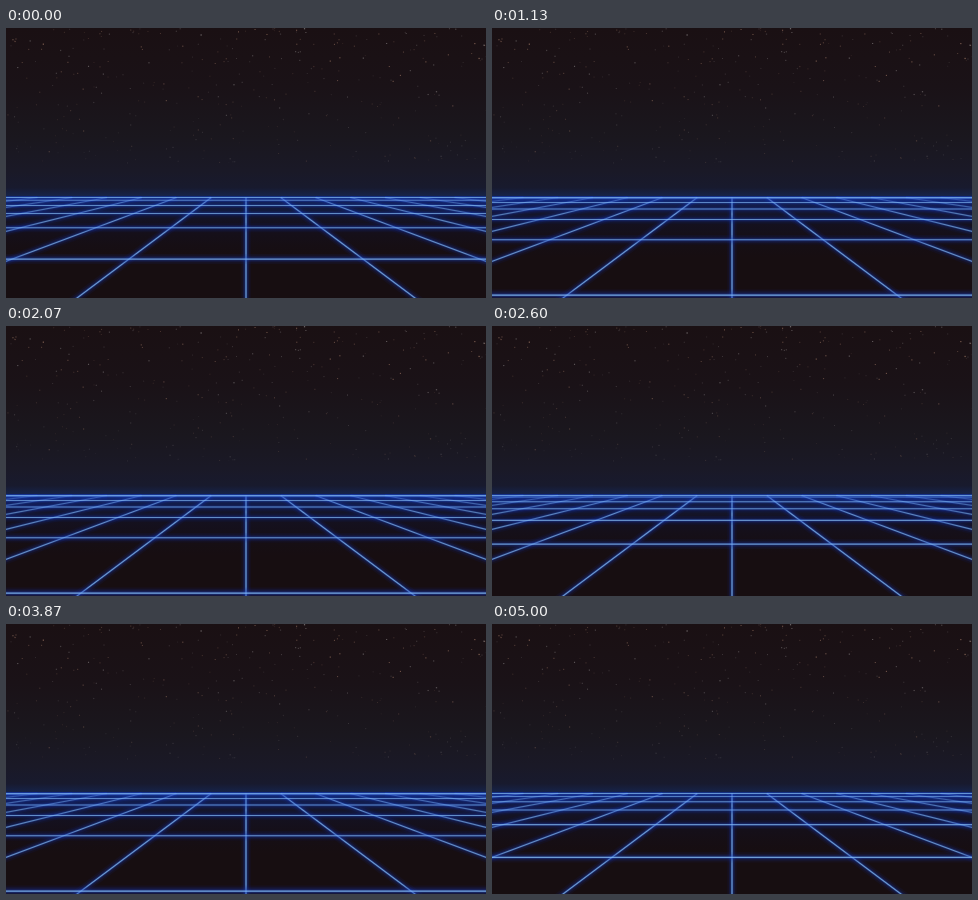
Recreate the animation shown at these times as an HTML page with a canvas. Size 480x270 px, loop 5070 ms.

```html
<!DOCTYPE html>
<html lang="en">
<head>
<meta charset="utf-8">
<title>Neon grid</title>
<style>
  html, body { margin: 0; width: 100%; height: 100%; overflow: hidden; background: #1a1115; }
  canvas { display: block; width: 100vw; height: 100vh; }
</style>
</head>
<body>
<canvas id="stage" width="480" height="270"></canvas>
<script>
const W = 480, H = 270;
const LOOP = 5070, STEP = 200 / 3, LAST = 75;
const HORIZON = 168, FAR = 169.5;
const ROW_VANISH = 148, DEPTH = 137, START = 0.65;
const RAY_VANISH = 143.5, SPREAD = 169;

// [step, rows travelled toward the viewer]
const TRAVEL = [[0, 0], [7, 0.968], [17, 2.5], [31, 4.5], [48, 7.045], [58, 8.5], [75, 11.045]];

const ctx = document.getElementById('stage').getContext('2d');

function seeded(seed) {
  return () => {
    seed = (seed * 1664525 + 1013904223) % 4294967296;
    return seed / 4294967296;
  };
}

function verticalGradient(g, y0, y1, stops) {
  const fill = g.createLinearGradient(0, y0, 0, y1);
  stops.forEach(([at, color]) => fill.addColorStop(at, color));
  return fill;
}

function paintStars(g) {
  const rand = seeded(41);
  for (let i = 0; i < 330; i++) {
    const x = rand() * W, y = 135 * Math.pow(rand(), 1.4);
    const light = rand(), size = 0.8 + rand() * 0.5;
    const alpha = (0.2 + 0.5 * light * light) * (1 - y / 200);
    g.fillStyle = `rgba(${rand() < 0.5 ? '190,145,120' : '165,160,160'},${alpha})`;
    g.fillRect(x, y, size, size);
  }
}

function paintBackdrop() {
  const canvas = document.createElement('canvas');
  canvas.width = W;
  canvas.height = H;
  const g = canvas.getContext('2d');

  g.fillStyle = verticalGradient(g, 0, HORIZON, [
    [0, '#1a1013'], [0.35, '#1a1217'], [0.65, '#1a171e'],
    [0.85, '#1a1927'], [0.95, '#181a2e'], [1, '#162349']
  ]);
  g.fillRect(0, 0, W, HORIZON);
  paintStars(g);

  g.fillStyle = '#170e11';
  g.fillRect(0, HORIZON, W, H - HORIZON);
  g.fillStyle = verticalGradient(g, HORIZON, 230, [
    [0, 'rgba(22,58,130,0.7)'], [0.15, 'rgba(17,38,92,0.5)'],
    [0.45, 'rgba(15,22,58,0.35)'], [1, 'rgba(14,14,34,0)']
  ]);
  g.fillRect(0, HORIZON, W, 62);
  return canvas;
}

const backdrop = paintBackdrop();

// Thin pale core inside a wide, dim blue halo.
function neon(x0, y0, x1, y1, core, strength) {
  const layers = [
    [core * 8, `rgba(20,40,150,${0.12 * strength})`],
    [core * 5, `rgba(22,54,180,${0.2 * strength})`],
    [core * 2.4, `rgba(32,84,215,${0.34 * strength})`],
    [core, `rgba(138,194,248,${0.9 * strength})`]
  ];
  ctx.beginPath();
  ctx.moveTo(x0, y0);
  ctx.lineTo(x1, y1);
  for (const [width, color] of layers) {
    ctx.lineWidth = width;
    ctx.strokeStyle = color;
    ctx.stroke();
  }
}

function travelAt(step) {
  const i = Math.max(1, TRAVEL.findIndex(([at]) => at >= step));
  const [s0, d0] = TRAVEL[i - 1], [s1, d1] = TRAVEL[i];
  return d0 + (d1 - d0) * (step - s0) / (s1 - s0);
}

function drawRays() {
  const bottom = H + 6;
  const reach = y => SPREAD * (y - RAY_VANISH) / (H - RAY_VANISH);
  for (let k = -7; k <= 7; k++) {
    const strength = Math.max(0.5, 0.88 - 0.07 * Math.abs(k));
    neon(W / 2 + k * reach(FAR), FAR, W / 2 + k * reach(bottom), bottom, 1.2, strength);
  }
}

function drawRows(step) {
  const shift = START - travelAt(step);
  const phase = shift - Math.floor(shift);
  for (let z = phase + 1; z < 6.6; z++) {
    neon(0, ROW_VANISH + DEPTH / z, W, ROW_VANISH + DEPTH / z, 0.9 + 0.6 / z, 0.62 + 0.36 / z);
  }
  neon(0, FAR, W, FAR, 1.1, 0.75);
}

function draw(step) {
  ctx.drawImage(backdrop, 0, 0);
  ctx.save();
  ctx.beginPath();
  ctx.rect(0, HORIZON, W, H - HORIZON);
  ctx.clip();
  drawRays();
  drawRows(step);
  ctx.restore();
}

const origin = performance.now();

function tick() {
  const time = (performance.now() - origin) % LOOP;
  draw(Math.min(LAST, Math.floor((time + 5) / STEP)));
  requestAnimationFrame(tick);
}

tick();
</script>
</body>
</html>
```
